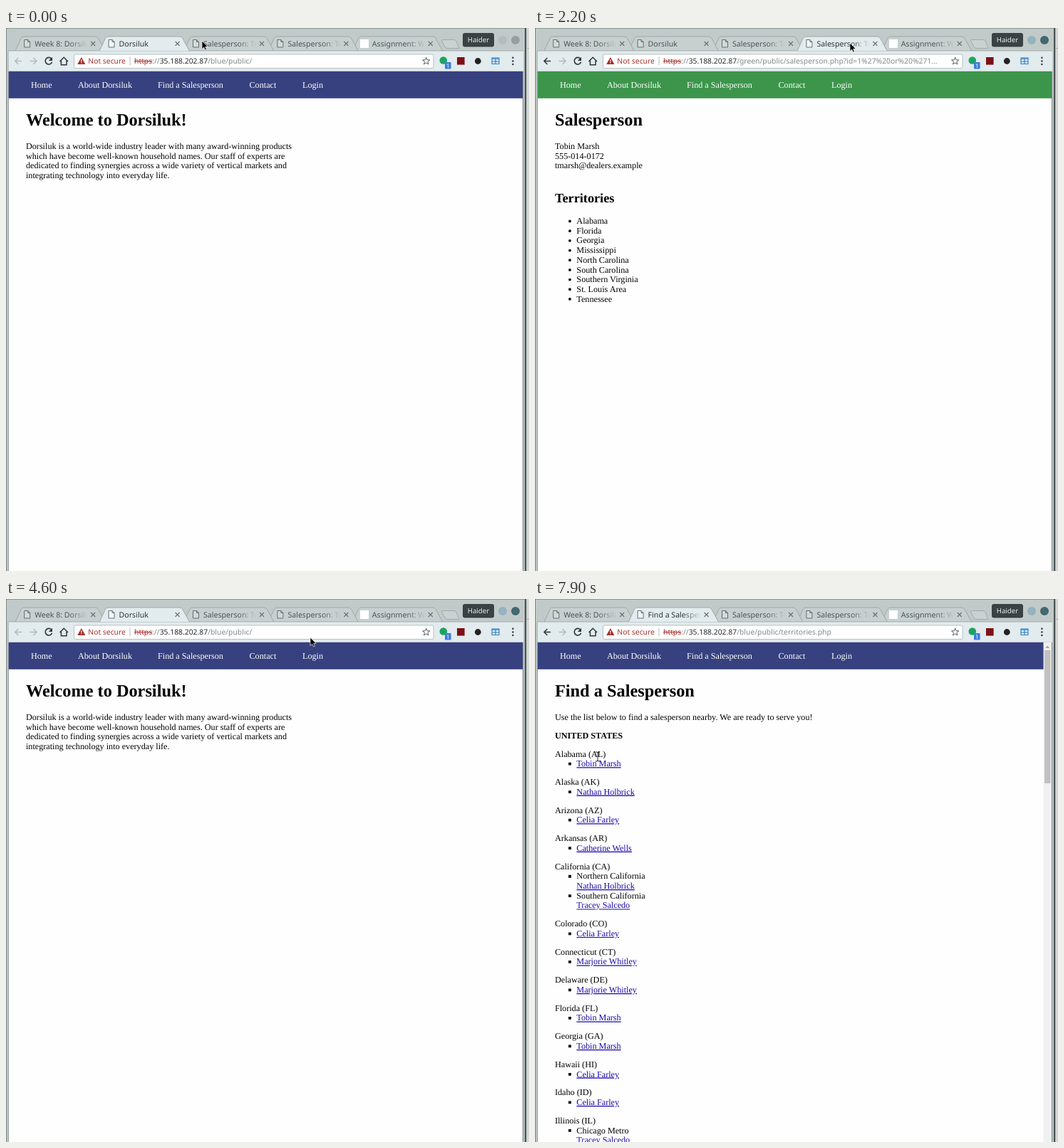
Animation of 734x763 px, one loop 8000 ms. Source, as an HTML page:

```html
<!DOCTYPE html>
<html lang="en">
<head>
<meta charset="utf-8">
<title>Browser session</title>
<style>
  html, body { margin: 0; width: 100%; height: 100%; overflow: hidden; background: #fefefe; }
  svg { display: block; width: 734px; height: 763px; }
  text { text-rendering: geometricPrecision; white-space: pre; }
  .ui { font: 10.35px "Noto Sans", "Open Sans", sans-serif; }
  .tab { font-size: 10.6px; }
  .page { font: 12.16px "Liberation Serif", "Times New Roman", serif; }
  .h1 { font-size: 24.32px; font-weight: bold; }
  .h2 { font-size: 18.24px; font-weight: bold; }
  .bold { font-weight: bold; }
  .link { fill: #1a08a8; text-decoration: underline; }
</style>
</head>
<body>
<svg viewBox="0 0 734 763" xmlns="http://www.w3.org/2000/svg">
  <defs>
    <linearGradient id="fade" gradientUnits="userSpaceOnUse" x1="48" x2="75" y1="0" y2="0">
      <stop offset="0" stop-color="#fff"/><stop offset="1" stop-color="#000"/>
    </linearGradient>
    <mask id="cut" maskUnits="userSpaceOnUse" x="-2" y="0" width="80" height="40">
      <rect x="-2" width="80" height="40" fill="url(#fade)"/>
    </mask>
  </defs>
  <g id="scene"></g>
  <g id="pointer">
    <path id="arrow" d="M0 0V11.6L2.7 9.2L4.5 13L6.4 12.2L4.7 8.5H8.2Z" fill="#000" stroke="#fff" stroke-width=".7"/>
    <path id="hand" d="M-1.3 7V1.2a1.3 1.3 0 0 1 2.6 0V4.2L6 5Q7.6 5.4 7.5 7L6.6 11.8H-1.6L-4.6 8Q-5.2 6.4-3.4 6.3Z" fill="#111" stroke="#fff" stroke-width=".7"/>
    <path id="beam" d="M-3-6.5H-1L0-5.5L1-6.5H3M0-5.5V5.5M-3 6.5H-1L0 5.5L1 6.5H3" fill="none" stroke="#222"/>
  </g>
</svg>
<script>
const LOOP = 8000, LINE = 13.68, GAP = 12.16, TAB = 118.4;
const TITLE_Y = 136.6, BODY_Y = 169.9;
const COMPANY = "Dorsiluk", SELLER = "Tobin Marsh";
const BLUE = "#37417f", RED = "#ad282b", GREEN = "#3c954b";
const $ = id => document.getElementById(id);

const text = (x, y, s, cls = "", extra = "") => `<text x="${x}" y="${y}" class="${cls}" ${extra}>${s}</text>`;
const rect = (x, y, w, h, fill, extra = "") => `<rect x="${x}" y="${y}" width="${w}" height="${h}" fill="${fill}" ${extra}/>`;
const disc = (x, y, r, fill) => `<circle cx="${x}" cy="${y}" r="${r}" fill="${fill}"/>`;
const line = (d, stroke, w = 1, fill = "none") => `<path d="${d}" fill="${fill}" stroke="${stroke}" stroke-width="${w}"/>`;
const paragraph = lines => lines.map((s, i) => text(28, BODY_Y + i * LINE, s)).join("");

// Pages

const nav = [[35, "Home"], [101, "About " + COMPANY], [213, "Find a Salesperson"], [341.5, "Contact"], [416, "Login"]];

function homePage() {
  return text(28, TITLE_Y, `Welcome to ${COMPANY}!`, "h1") + paragraph([
    COMPANY + " is a world-wide industry leader with many award-winning products",
    "which have become well-known household names. Our staff of experts are",
    "dedicated to finding synergies across a wide variety of vertical markets and",
    "integrating technology into everyday life."
  ]);
}

function sellerPage() {
  const areas = ["Alabama", "Florida", "Georgia", "Mississippi", "North Carolina", "South Carolina",
    "Southern Virginia", "St. Louis Area", "Tennessee"];
  return text(28, TITLE_Y, "Salesperson", "h1") +
    paragraph([SELLER, "555-014-0172", "tmarsh@dealers.example"]) +
    text(28, 244.9, "Territories", "h2") +
    areas.map((s, i) => {
      const y = 275.1 + i * LINE;
      return disc(48.9, y - 3.6, 1.9, "#000") + text(58.4, y, s);
    }).join("");
}

function listPage() {
  const nathan = "Nathan Holbrick", celia = "Celia Farley", tracey = "Tracey Salcedo", marjorie = "Marjorie Whitley";
  const states = [
    ["Alabama (AL)", [SELLER]],
    ["Alaska (AK)", [nathan]],
    ["Arizona (AZ)", [celia]],
    ["Arkansas (AR)", ["Catherine Wells"]],
    ["California (CA)", [nathan, "Northern California"], [tracey, "Southern California"]],
    ["Colorado (CO)", [celia]],
    ["Connecticut (CT)", [marjorie]],
    ["Delaware (DE)", [marjorie]],
    ["Florida (FL)", [SELLER]],
    ["Georgia (GA)", [SELLER]],
    ["Hawaii (HI)", [celia]],
    ["Idaho (ID)", [celia]],
    ["Illinois (IL)", [tracey, "Chicago Metro"]]
  ];
  let y = BODY_Y + LINE + GAP;
  let out = text(28, TITLE_Y, "Find a Salesperson", "h1") +
    paragraph(["Use the list below to find a salesperson nearby. We are ready to serve you!"]) +
    text(28, y, "UNITED STATES", "bold");
  y += LINE + GAP;
  for (const [state, ...areas] of states) {
    out += text(28, y, state);
    y += LINE;
    for (const [seller, area] of areas) {
      out += rect(47, y - 5.5, 3.8, 3.8, "#000");
      if (area) {
        out += text(58.4, y, area);
        y += LINE;
      }
      out += text(58.4, y, seller, "link");
      y += LINE;
    }
    y += GAP;
  }
  return out + rect(713.6, 60.8, 11.4, 703, "#f1f1f1") + rect(715, 72, 8.5, 187, "#c1c1c1") +
    `<path d="M716.3 69L719.2 65.5L722.1 69Z" fill="#a3a3a3"/>`;
}

// Browser window

const tabPath = i => {
  const x = 13 + TAB * i;
  return `M${x} 32L${x + 8} 14.5Q${x + 9.5} 12 ${x + 12} 12H${x + 112}Q${x + 115} 12 ${x + 116.5} 14.5L${x + 126} 32`;
};

function tab(i, title, active) {
  const x = 40.2 + TAB * i;
  const icon = i === 4 ? rect(497, 16, 12, 12, "#fff")
    : line(`M${x - 14.5} 16.5H${x - 9.5}L${x - 6.5} 19.5V27H${x - 14.5}ZM${x - 9.5} 16.5V19.5H${x - 6.5}`, "#596263", .9, active ? "#f4f8f8" : "#d3dada");
  return line(tabPath(i), "#98a3a2", .9, active ? "#e2ebed" : "#c7d0cf") + icon +
    `<g transform="translate(${x} 0)">${text(0, 25.6, title, "tab", `mask="url(#cut)" fill="${active ? "#2d3637" : "#4b5556"}"`)}</g>` +
    line(`M${x + 79} 19l6 6m0-6l-6 6`, "#667071", 1.1);
}

function windowFrame(focused) {
  return rect(0, 0, 734, 763, "#c1cac9") + rect(0, 0, 728, 1, "#8b9696") +
    rect(0, 0, .8, 763, "#6b7576") + rect(2.8, 32, 1, 731, "#7b8586") + rect(725, 32, 1, 731, "#7b8586") +
    rect(728, 0, 2.5, 763, "#4b5455") + rect(730.5, 0, 3.5, 763, "#d3d7d7") + rect(731, 28, 3, 1, "#a9afaf") +
    line("M613 16.5H629Q631 16.5 632 18.5L636 28.5H619Q617 28.5 616 26.5L611.5 18Q611 16.5 613 16.5Z", "#9ba6a5", .9, "#cad2d1") +
    rect(641.5, 7.5, 43, 18.5, "#3a4243", 'rx="2" stroke="#293031" stroke-width=".8"') +
    text(663, 20.3, "Haider", "", 'text-anchor="middle" fill="#e8eded" style="font-size:9.7px"') +
    disc(697, 17, 6, focused ? "#93b3bf" : "#b3bdbd") + disc(715, 17, 6, focused ? "#41696f" : "#959f9f");
}

function toolbar(path, canGoBack) {
  const dark = "#2f3738", pale = "#b3bbbd";
  const star = Array.from({ length: 10 }, (_, i) => {
    const a = -Math.PI / 2 + i * Math.PI / 5, r = i % 2 ? 2.3 : 5.4;
    return `${(589.7 + r * Math.cos(a)).toFixed(2)} ${(46.6 + r * Math.sin(a)).toFixed(2)}`;
  }).join("L");
  return rect(3.4, 32, 722.6, 29, "#e2ebed") + line("M3.4 32H726", "#98a3a2", .8) +
    line("M22 46.5H13M17.3 42L12.8 46.5L17.3 51", canGoBack ? dark : pale, 1.5) +
    line("M33.5 46.5H43M38.5 42L43 46.5L38.5 51", pale, 1.5) +
    line("M63.6 43A4.8 4.8 0 1 0 64.6 47.7", dark, 1.6) + `<path d="M65 40.8V46H59.8Z" fill="${dark}"/>` +
    line("M75.5 47L81.2 41.2L87 47M77.4 46V51.7H85V46", dark, 1.5) +
    rect(95.5, 37, 504.5, 19.5, "#fff", 'rx="2" stroke="#b2bbbc" stroke-width=".9"') +
    `<path d="M105.8 41L111.4 51H100.2Z" fill="#a62d28"/>` + line("M105.8 44.2V47.4M105.8 48.3V49.6", "#fff", 1.2) +
    text(115.3, 50.2, "Not secure", "", 'fill="#a6342d"') + line("M174 40.5V52.5", "#aeb5b5", .9) +
    text(180, 50.2, `<tspan fill="#a6342d" text-decoration="line-through">https</tspan><tspan fill="#7f8788">://</tspan>` +
      `<tspan fill="#262b2c">35.188.202.87</tspan><tspan fill="#828a8b">${path}</tspan>`) +
    line(`M${star}Z`, "#50595a", 1) +
    disc(613.8, 45.5, 5.3, "#1da462") + rect(616, 48, 8.6, 9.5, "#3f7fdb", 'rx="1"') +
    text(620.3, 55.8, "1", "", 'text-anchor="middle" fill="#fff" style="font-size:8px"') +
    rect(633, 41, 10.6, 10.6, "#7d1016") + disc(662.3, 46.5, 4.4, "#222") +
    line("M682 42H692V50.5H682ZM682 43.2H692M687 43V50.5M682 47H692", "#2f7cc0", 1.1, "#dcebf5") +
    [41.8, 46.4, 51].map(y => disc(711.4, y, 1.25, dark)).join("");
}

// Each step holds from its time until the next one.
const query = "/public/salesperson.php?id=1%27%20or%20%271";
const steps = [
  { at: 0, tab: 1, color: BLUE, path: "/blue/public/", page: homePage, blurred: true },
  { at: 300, tab: 2, color: RED, path: `/red${query}=1...`, page: sellerPage, back: true },
  { at: 2100, tab: 3, color: GREEN, path: `/green${query}...`, page: sellerPage, back: true },
  { at: 3800, tab: 1, color: BLUE, path: "/blue/public/", page: homePage },
  { at: 6900, tab: 1, color: BLUE, path: "/blue/public/territories.php", page: listPage, back: true, title: "Find a Salesperson" }
];

function drawScene(s) {
  const seller = "Salesperson: " + SELLER;
  const titles = ["Week 8: " + COMPANY, s.title || COMPANY, seller, seller, "Assignment: Week 8"];
  const tabs = titles.map((t, i) => tab(i, t, i === s.tab));
  const rest = tabs.filter((_, i) => i !== s.tab).reverse().join("");
  const links = nav.map(([x, label]) => text(x, 84.1, label, "", 'fill="#fff"')).join("");
  // The minute rotation keeps baselines from snapping to whole pixels.
  $("scene").innerHTML =
    `<g class="ui">${windowFrame(!s.blurred)}${rest}${toolbar(s.path, s.back)}${tabs[s.tab]}</g>` +
    rect(3.8, 60.8, 721.2, 703, "#fefefe") + rect(3.8, 60.8, 721.2, 38, s.color) +
    `<g class="page" transform="rotate(.004)">${links}${s.page()}</g>`;
}

// Pointer path: time, x, y
const moves = [
  [0, 275, 18], [1000, 275, 18], [1100, 284, 14], [1300, 350, 29], [1500, 452, 40], [1600, 447, 31],
  [1900, 442, 21], [2800, 442, 21], [3000, 532, 14], [3100, 554, 18], [3300, 440, 26], [3600, 162, 14],
  [3800, 184, 17], [4000, 315, 34], [4200, 439, 46], [4300, 439, 46], [4400, 425, 60], [4500, 425, 60],
  [4600, 427, 54], [4700, 402, 47], [4900, 300, 90], [5000, 276, 79], [5400, 276, 79], [5500, 165, 90],
  [5600, 41, 77], [5700, 160, 90], [5800, 279, 72.5], [5900, 279, 72.5], [6200, 267, 77], [6300, 269.5, 78],
  [6800, 269.5, 78], [7200, 170, 140], [7600, 88, 213], [7700, 88, 213], [7800, 88, 228], [7900, 88, 221.5]
];

function pointerAt(t) {
  const i = moves.findIndex(m => m[0] > t);
  if (i < 0) return moves[moves.length - 1].slice(1);
  const [t0, x0, y0] = moves[i - 1], [t1, x1, y1] = moves[i];
  const k = (t - t0) / (t1 - t0);
  return [x0 + (x1 - x0) * k, y0 + (y1 - y0) * k];
}

function pointerKind(t, x, y) {
  if (t >= 7500) return "beam";
  const spans = [[35, 64], [101, 177], [213, 305], [341, 380], [416, 445]];
  return y > 71 && y < 88 && spans.some(([a, b]) => x >= a && x <= b) ? "hand" : "arrow";
}

let shown;
function render(t) {
  const step = steps.filter(s => s.at <= t).pop();
  if (step !== shown) drawScene(shown = step);
  const tick = Math.floor(t / 100) * 100;
  const [x, y] = pointerAt(tick);
  const kind = pointerKind(tick, x, y);
  for (const id of ["arrow", "hand", "beam"]) $(id).style.display = id === kind ? "" : "none";
  $("pointer").setAttribute("transform", `translate(${x} ${y})`);
}

const start = performance.now();
function loop() {
  render((performance.now() - start) % LOOP);
  requestAnimationFrame(loop);
}
loop();
</script>
</body>
</html>
```
